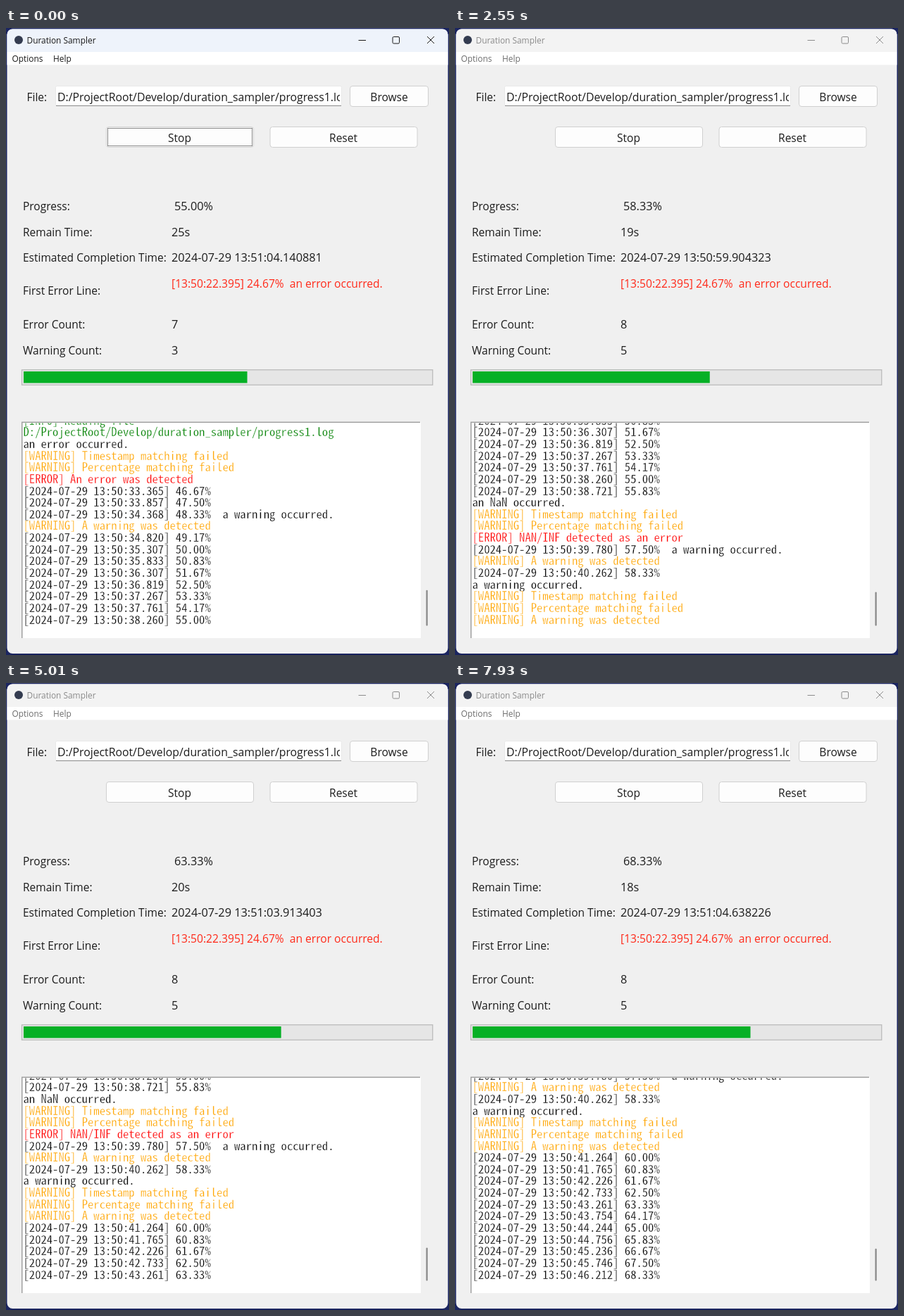
An HTML page that plays this animation: 629x891 px, repeating every 8000 ms.

```html
<!DOCTYPE html>
<html lang="en">
<head>
<meta charset="utf-8">
<title>Duration Sampler</title>
<style>
  html, body { margin: 0; width: 100%; height: 100%; overflow: hidden; background: #1b2560; }
  svg { display: block; width: 629px; height: 891px; }
  text { font-family: "Open Sans", "Noto Sans", sans-serif; font-size: 15.5px; fill: #1c1c1c; white-space: pre; }
  .small { font-size: 11.9px; }
  .value { font-size: 16.3px; }
  .path { font-size: 15.8px; }
  .alert { font-size: 15.6px; fill: #ff2a1a; }
  .mid { text-anchor: middle; }
  .button { fill: #fdfdfd; stroke: #d0d0d0; }
  /* The white outline thins the strokes of the log type. */
  .log text {
    font-family: "Noto Sans Mono CJK SC", "Liberation Mono", monospace;
    font-size: 16.63px; font-size-adjust: ch-width 0.5;
    stroke: #fff; stroke-width: 0.3px;
  }
  .bar, .title, .menu, .signs, .focus { animation: 8s linear infinite; }
  .bar { fill: #eef3fb; animation-name: bar; }
  .title { fill: #1a1a1a; animation-name: title; }
  .menu { fill: #1a1a1a; animation-name: menu; }
  .signs { fill: none; stroke: #1a1a1a; animation-name: signs; }
  .focus { fill: none; stroke: #111; stroke-dasharray: 1 1; animation-name: focus; }
  /* The window loses focus between 260 and 540 ms. */
  @keyframes bar { 0%, 3.25% { fill: #eef3fb } 6.75%, 100% { fill: #f3f3f3 } }
  @keyframes title { 0%, 3.25% { fill: #1a1a1a } 6.75%, 100% { fill: #8b8b8b } }
  @keyframes menu { 0%, 3.24% { fill: #1a1a1a } 3.25%, 100% { fill: #6d6d6d } }
  @keyframes signs { 0%, 3.25% { stroke: #1a1a1a } 6.75%, 100% { stroke: #8b8b8b } }
  @keyframes focus { 0%, 3.24% { opacity: 1 } 3.25%, 100% { opacity: 0 } }
</style>
</head>
<body>
<svg viewBox="0 0 629 891">
  <defs>
    <clipPath id="frame"><rect x="1.5" y="1.5" width="626" height="887.5" rx="8"/></clipPath>
    <clipPath id="entry"><rect x="72" y="83" width="402" height="27"/></clipPath>
    <clipPath id="page"><rect x="24" y="561.5" width="564" height="305"/></clipPath>
  </defs>

  <g clip-path="url(#frame)">
    <rect width="629" height="891" fill="#f0f0f0"/>
    <rect class="bar" width="629" height="34"/>
    <rect y="34" width="629" height="18.5" fill="#fff"/>
  </g>

  <circle cx="18" cy="17" r="6" fill="#343c50"/>
  <text class="small title" x="29.5" y="21.8">Duration Sampler</text>
  <g class="signs">
    <path d="M500.5 17.5H511M598 12l10 10M608 12l-10 10"/>
    <rect x="549" y="12.5" width="9.5" height="9.5" rx="1.5"/>
  </g>
  <text class="small menu" x="8.5" y="48.4">Options</text>
  <text class="small menu" x="67" y="48.4">Help</text>

  <text x="29.5" y="103.6">File:</text>
  <rect x="70.5" y="82.5" width="406" height="28" rx="2" fill="#fff" stroke="#e8e8e8"/>
  <path d="M71 110.5H476" stroke="#8a8a8a"/>
  <g clip-path="url(#entry)">
    <text class="path" x="73" y="103.6">D:/ProjectRoot/Develop/duration_sampler/progress1.log</text>
  </g>

  <rect class="button" x="488.5" y="82.5" width="111" height="29" rx="3.5"/>
  <rect class="button" x="142.5" y="140.5" width="209" height="29" rx="3.5"/>
  <rect class="button" x="375" y="140.5" width="209" height="29" rx="3.5"/>
  <rect class="focus" x="144.5" y="142.5" width="205" height="25"/>
  <text class="mid" x="544" y="103.6">Browse</text>
  <text class="mid" x="246.5" y="162">Stop</text>
  <text class="mid" x="479" y="162">Reset</text>

  <text x="24" y="259">Progress:</text>
  <text x="24" y="295.5">Remain Time:</text>
  <text x="24" y="332">Estimated Completion Time:</text>
  <text x="24" y="379">First Error Line:</text>
  <text x="24" y="427">Error Count:</text>
  <text x="24" y="463.5">Warning Count:</text>

  <text class="value" id="progress" x="239" y="259"></text>
  <text class="value" id="remain" x="235" y="295.5"></text>
  <text class="value" id="finish" x="235" y="332"></text>
  <text class="alert" x="235" y="368.5">[13:50:22.395] 24.67%  an error occurred.</text>
  <text class="value" id="errors" x="235" y="427"></text>
  <text class="value" id="warnings" x="235" y="463.5"></text>

  <rect x="22.5" y="485.75" width="583.25" height="21.5" fill="#e6e6e6" stroke="#bcbcbc" stroke-width="1.3"/>
  <rect id="fill" x="25" y="488" height="16.5" fill="#06b025"/>

  <rect x="22" y="559.5" width="567" height="307.5" fill="#fff"/>
  <path d="M22.75 867V560.25H588" fill="none" stroke="#a0a0a0" stroke-width="1.5"/>
  <g class="log" clip-path="url(#page)"></g>
  <rect id="thumb" x="596.5" width="2.2" rx="1" fill="#868686"/>
</svg>

<script>
const LOOP = 8000, ROWS = 18, LINE = 16.63, LAST = 846.5, BAR = 577.3;
const $ = id => document.getElementById(id);
const percent = k => (k / 1.2).toFixed(2) + '%';

const plain = s => [s, '#000'];
const note = s => [s, '#008000'];
const warn = s => ['[WARNING] ' + s, '#ffa500'];
const fail = s => ['[ERROR] ' + s, '#ff0000'];
const stamp = (sec, k, tail = '') =>
  plain(`[2024-07-29 13:50:${sec.toFixed(3)}] ${percent(k)}${tail}`);
const unmatched = [warn('Timestamp matching failed'), warn('Percentage matching failed')];
const detected = warn('A warning was detected');
const warned = '  a warning occurred.';

const history = [
  note('[INFO] Reading file'),
  note('D:/ProjectRoot/Develop/duration_sampler/progress1.log'),
  plain('an error occurred.'), ...unmatched, fail('An error was detected'),
  stamp(33.365, 56), stamp(33.857, 57), stamp(34.368, 58, warned), detected,
  ...[34.82, 35.307, 35.833, 36.307, 36.819, 37.267, 37.761, 38.26].map((s, i) => stamp(s, 59 + i))
];

// Each event carries the state from its time on.
const events = [];
let state = { at: 0, lines: history, sec: 38.26, k: 66, eta: 64.140881, errors: 7, warnings: 3, lag: 0 };
events.push(state);
function add(at, lines, change) {
  state = { ...state, lag: 0, ...change, at, lines: [...state.lines, ...lines] };
  events.push(state);
}
const tick = (at, sec, k, eta, lag = 0) => add(at, [stamp(sec, k)], { sec, k, eta, lag });

tick(540, 38.721, 67, 63.827416);
add(1010, [plain('an NaN occurred.'), ...unmatched, fail('NAN/INF detected as an error')], { errors: 8 });
add(1480, [stamp(39.78, 69, warned), detected], { sec: 39.78, k: 69, eta: 57.579272, warnings: 4, lag: 70 });
tick(2010, 40.262, 70, 59.904323);
add(2480, [plain('a warning occurred.'), ...unmatched, detected], { warnings: 5 });
tick(3020, 41.264, 72, 60.412655);
tick(3480, 41.765, 73, 58.978837);
tick(3940, 42.226, 74, 60.937128);
tick(4410, 42.733, 75, 62.581946, 70);
tick(4940, 43.261, 76, 63.913403, 70);
tick(5470, 43.754, 77, 64.316097);
tick(5940, 44.244, 78, 64.627351);
tick(6470, 44.756, 79, 65.0488);
tick(6930, 45.236, 80, 64.903514);
tick(7470, 45.746, 81, 64.718469);
tick(7870, 46.212, 82, 64.638226, 60);

const log = document.querySelector('.log');
const rows = Array.from({ length: ROWS }, (_, i) => {
  const row = document.createElementNS('http://www.w3.org/2000/svg', 'text');
  row.setAttribute('x', 24.5);
  row.setAttribute('y', LAST - (ROWS - 1 - i) * LINE);
  return log.appendChild(row);
});

function clock(eta) {
  const sec = (eta % 60).toFixed(6).padStart(9, '0');
  return `2024-07-29 13:${50 + Math.floor(eta / 60)}:${sec}`;
}

function show(s) {
  $('progress').textContent = percent(s.k);
  $('remain').textContent = Math.floor(s.eta - s.sec) + 's';
  $('finish').textContent = clock(s.eta);
  $('errors').textContent = s.errors;
  $('warnings').textContent = s.warnings;
  const tail = s.lines.slice(-ROWS);
  rows.forEach((row, i) => {
    [row.textContent, row.style.fill] = tail[i];
  });
  const top = 798.8 + 0.22 * (s.lines.length - history.length);
  $('thumb').setAttribute('y', top);
  $('thumb').setAttribute('height', 849.5 - top);
}

let start, shown;
function draw(now) {
  start ??= now;
  const t = (now - start) % LOOP;
  const i = events.findLastIndex(e => e.at <= t);
  const s = events[i];
  if (s !== shown) show(shown = s);
  // The bar takes a half step while a slow update settles.
  const half = t < s.at + s.lag ? (s.k - events[i - 1].k) / 2 : 0;
  $('fill').setAttribute('width', BAR * (s.k - half) / 120);
  requestAnimationFrame(draw);
}
requestAnimationFrame(draw);
</script>
</body>
</html>
```
